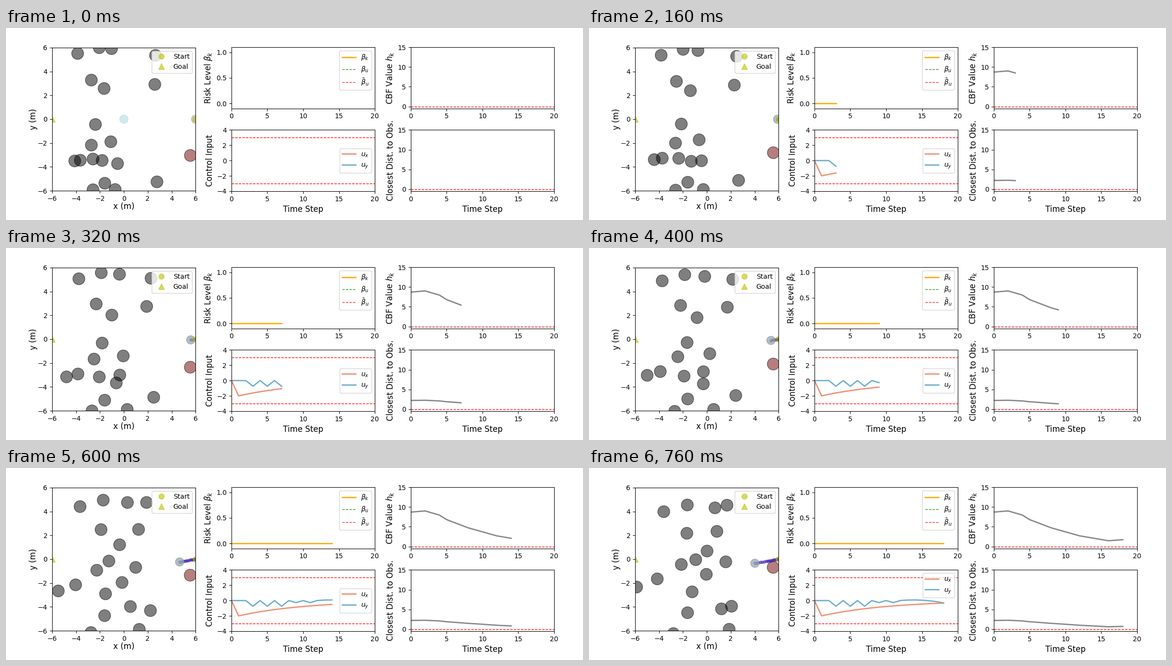
These frames come from a looping animation (1200x400 px, 1.2 s). A matplotlib script:

```python
import numpy as np
import matplotlib.pyplot as plt
from matplotlib.animation import FuncAnimation
from matplotlib.patches import Circle

FRAMES, LAST = 30, 19
DT = 0.1
ROBOT_R, OBSTACLE_R = 0.35, 0.5
PX_PER_M = 1044 / 3.5 / 12

fig = plt.figure(figsize=(12, 4), dpi=100)
grid = fig.add_gridspec(2, 3, left=0.08, right=0.95, bottom=0.15, top=0.9,
                        wspace=0.25, hspace=0.35)
world = fig.add_subplot(grid[:, 0], aspect="equal", xlim=(-6, 6), ylim=(-6, 6))
world.set_xticks(range(-6, 7, 2))
world.set_yticks(range(-6, 7, 2))
world.set_xlabel("x (m)", fontsize=12, labelpad=0)
world.set_ylabel("y (m)", fontsize=12, labelpad=0)


def add_chart(row, col, ylabel, ylim, yticks, limits=()):
    ax = fig.add_subplot(grid[row, col], xlim=(0, 20), ylim=ylim)
    ax.set_xticks(range(0, 21, 5))
    ax.set_yticks(yticks)
    ax.set_ylabel(ylabel, fontsize=12)
    if row == 1:
        ax.set_xlabel("Time Step", fontsize=12)
    for level in limits:
        ax.axhline(level, color="red", ls="--", lw=1)
    return ax


risk = add_chart(0, 1, r"Risk Level $\beta_k$", (-0.1, 1.1), (0, 0.5, 1))
control = add_chart(1, 1, "Control Input", (-4, 4), range(-4, 5, 2), (3, -3))
cbf = add_chart(0, 2, "CBF Value $h_k$", (-0.5, 15), range(0, 16, 5), (0,))
dist = add_chart(1, 2, "Closest Dist. to Obs.", (-0.5, 15),
                 range(0, 16, 5), (0,))

# Forward input pulls the speed towards -2 m/s; sideways input first
# chatters on odd steps, then follows a smooth arc.
steps = np.arange(LAST)
ux = np.where(steps > 0, -2 * 0.9 ** (steps - 1.0), 0)
chatter = np.where(steps < 8, -0.74, -0.27) * (steps % 2) * (steps > 2)
uy = np.where(steps < 12, chatter, 0.08 - 0.022 * (steps - 13.8) ** 2)


def integrate(start, u):
    v = np.cumsum(u) * DT
    return start + np.cumsum(v * DT - 0.5 * u * DT ** 2)


robot_x, robot_y = integrate(6, ux), integrate(0, uy)

# The barrier is the squared centre distance less the squared radii sum.
reach = ROBOT_R + OBSTACLE_R
h = np.interp(steps, [0, 2, 4, 5, 8, 12, 16, 18],
              [8.7, 9, 7.95, 6.8, 4.73, 2.69, 1.46, 1.72])
gap = np.sqrt(h + reach ** 2) - reach

# Start and end of each obstacle in stage pixels; the last one is nearest.
ROUTES = [
    (149, 53, 155.5, 91), (194, 41, 204.5, 77), (219.5, 43, 262, 83),
    (311, 57, 287, 77.5), (177.5, 108.5, 203.5, 136), (204, 126, 245.5, 173),
    (309.5, 117.5, 266, 132), (186, 201, 222, 191), (218, 237, 284.5, 195.5),
    (177.5, 244, 192, 201), (143, 277, 99, 248), (154.5, 275.5, 142, 231),
    (181, 273, 214.5, 258), (200, 276, 275.5, 293.5), (232, 282.5, 244, 221.5),
    (205.5, 323.5, 205, 301.5), (181, 337, 175.5, 345), (227, 336.5, 291.5, 336),
    (314, 320.5, 296.5, 288), (383.5, 265.5, 383, 207),
]
obstacles = []
for x0, y0, x1, y1 in ROUTES:
    t = steps / steps[-1]
    x = (x0 + (x1 - x0) * t - 96) / PX_PER_M - 6
    y = (190 - y0 - (y1 - y0) * t ** 1.3) / PX_PER_M
    patch = Circle((x[0], y[0]), OBSTACLE_R, color="black", alpha=0.5)
    world.add_patch(patch)
    obstacles.append((patch, x, y))
obstacles[-1][0].set_facecolor("#6e0000")

trail, = world.plot([], [], "o", ms=4, color="#3414b8", alpha=0.5, zorder=0.5)
halo = world.add_patch(Circle((0, 0), ROBOT_R, color="lightblue", alpha=0.55))
body = world.add_patch(Circle((6, 0), ROBOT_R, color="gray", alpha=0.4))
world.plot(6, 0, "yo", ms=8, alpha=0.6, label="Start", ls="none")
world.plot(-6, 0, "y^", ms=8, alpha=0.6, label="Goal", ls="none")
world.legend(loc="upper right")

curves = []


def add_curve(ax, values, color, label=None):
    line, = ax.plot([], [], color=color, lw=2, label=label)
    curves.append((line, values))


add_curve(risk, np.zeros(LAST), "#ffad0f", r"$\beta_k$")
risk.plot([], [], "--", color="#2b912b", lw=1, label=r"$\beta_u$")
risk.plot([], [], "--", color="#ff2626", lw=1, label=r"$\bar{\beta}_u$")
add_curve(control, ux, "#f09274", "$u_x$")
add_curve(control, uy, "#70aed0", "$u_y$")
add_curve(cbf, h, "#888888")
add_curve(dist, gap, "#888888")
risk.legend(loc="upper right")
control.legend(loc="best")


def update(frame):
    count = min(frame, LAST)
    n = max(count - 1, 0)
    for patch, x, y in obstacles:
        patch.center = x[n], y[n]
    body.center = robot_x[n], robot_y[n]
    halo.center = body.center if count else (0, 0)
    trail.set_data(robot_x[:count], robot_y[:count])
    for line, values in curves:
        line.set_data(steps[:count], values[:count])
    return []


anim = FuncAnimation(fig, update, frames=FRAMES, interval=40, repeat=True,
                     repeat_delay=0)
plt.show()
```
